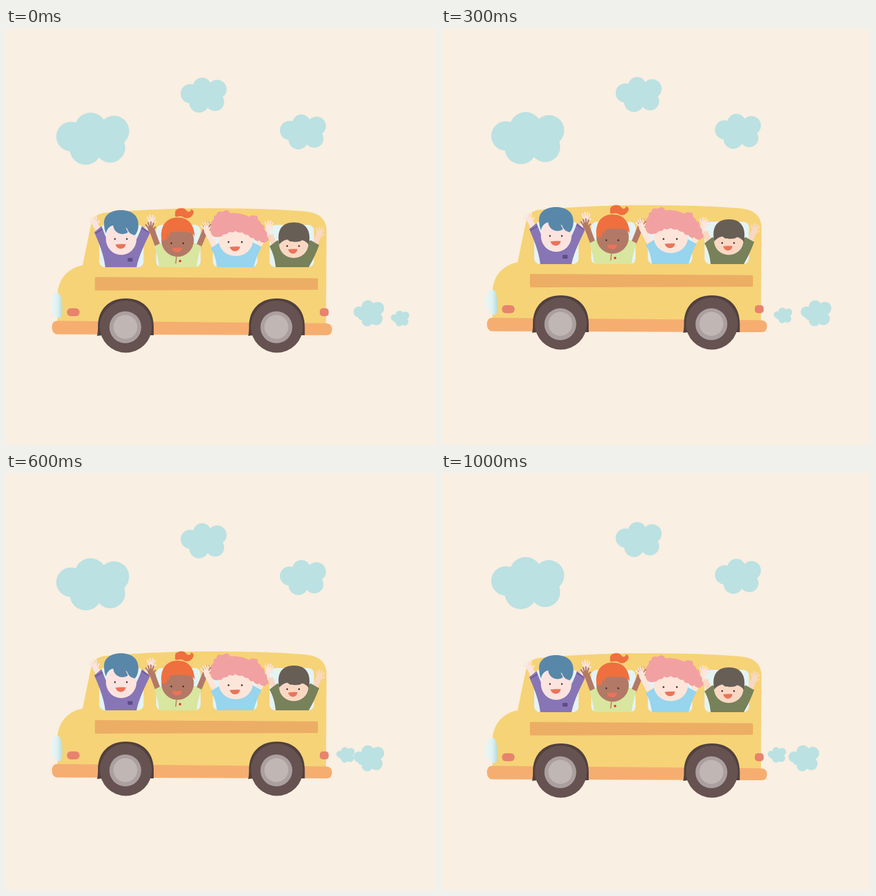
Write an HTML page that moves like this. It is 700 px wide and 680 px high and loops after 1.1 s.

```html
<!DOCTYPE html>
<html lang="en">
<head>
<meta charset="utf-8">
<title>School bus</title>
<style>
  html, body { margin: 0; width: 100%; height: 100%; overflow: hidden; background: #f9efe2; }
  svg { display: block; width: 100%; height: 100%; }

  .move { animation: 1100ms step-end infinite; }
  #bus { animation-name: bounce; }
  #sky { animation-name: drift; }
  #puff-big { animation-name: big; }
  #puff-small { animation-name: small; }

  /* eleven held poses of 100 ms */
  @keyframes bounce {
    0%, 90.9% { transform: translateY(0); }
    9.09%, 45.45%, 81.81% { transform: translateY(-1px); }
    18.18%, 72.72% { transform: translateY(-2px); }
    36.36%, 54.54% { transform: translateY(-3px); }
    27.27%, 63.63% { transform: translateY(-5px); }
  }
  @keyframes drift {
    0%, 45.45% { transform: translateY(0); }
    27.27%, 90.9% { transform: translateY(-1px); }
    54.54%, 81.81% { transform: translateY(1px); }
    63.63% { transform: translateY(2px); }
  }
  @keyframes big {
    0%, 45.45%, 81.81% { transform: translate(567px, 444px); }
    27.27% { transform: translate(587px, 444px); }
    36.36% { transform: translate(577px, 444px); }
    72.72% { transform: translate(539px, 437px); }
  }
  @keyframes small {
    0%, 72.72% { transform: translate(628px, 461px); }
    9.09% { transform: translate(645px, 454px); }
    18.18% { transform: translate(662px, 447px); }
    27.27% { transform: translate(543px, 456px); }
    36.36% { transform: translate(538px, 451px); }
    45.45%, 90.9% { transform: translate(533px, 447px); }
    54.54% { transform: translate(539px, 447px); }
    63.63% { transform: translate(545px, 447px); }
    81.81% { transform: translate(641px, 455px); }
  }

  .air { fill: #bbe1e2; }
  .eye { fill: #3a2a28; }
  .mouth { fill: #e9745a; }
  .glass { fill: #e4f3f4; }
  .lamp { fill: #e8836d; }
  .arm { fill: none; stroke-width: 9; }
  .pink { fill: #fbe3df; stroke: #fbe3df; }
  .brown { fill: #b27966; stroke: #b27966; }
  .cream { fill: #fde5da; stroke: #fde5da; }
  .peach { fill: #f9d8c3; stroke: #f9d8c3; }
  .face { stroke: none; }
  .pink.arm, .brown.arm, .cream.arm, .peach.arm { fill: none; }
</style>
</head>
<body>
<svg viewBox="0 0 700 680">
  <defs>
    <g id="cloud">
      <circle cx="24" cy="39" r="24"/>
      <circle cx="56" cy="26" r="26"/>
      <circle cx="94" cy="30" r="25"/>
      <circle cx="88" cy="57" r="24.5"/>
      <circle cx="48" cy="59" r="26"/>
      <rect x="35" y="22" width="62" height="42"/>
    </g>
    <g id="cloudlet">
      <circle cx="15.5" cy="26" r="15.5"/>
      <circle cx="35" cy="15" r="15"/>
      <circle cx="59.5" cy="19" r="15.5"/>
      <circle cx="56" cy="39.5" r="15"/>
      <circle cx="30" cy="41" r="16"/>
      <rect x="22" y="15" width="38" height="28"/>
    </g>
    <g id="puff">
      <circle cx="9" cy="19" r="9"/>
      <circle cx="23.5" cy="10.5" r="10.5"/>
      <circle cx="39.5" cy="13" r="10.5"/>
      <circle cx="37" cy="30" r="10.5"/>
      <circle cx="22.5" cy="33" r="9.3"/>
      <circle cx="13" cy="26" r="6"/>
      <rect x="14" y="12" width="26" height="20"/>
    </g>
    <g id="wheel">
      <path fill="#51403e" d="M-47 15Q-45.500 11-45.500 0C-45.500-29-27-46 0-46S45.500-29 45.500 0V14H-38Z"/>
      <circle r="42.500" fill="#655251"/>
      <circle cx="-.8" cy="1" r="26" fill="#ab9fa0"/>
      <circle cx="-.8" cy=".5" r="19.500" fill="#c0b7b5"/>
    </g>
    <g id="hand">
      <ellipse rx="4.500" ry="5.500" stroke="none"/>
      <path fill="none" stroke-width="2.400" stroke-linecap="round"
        d="M-3-1L-6.500-8M-1.300-3L-2.500-11M1-3L2-11.500M2.800-2L6-9M3 2L8-2"/>
    </g>
    <rect id="window" y="321" width="72.500" height="69" rx="9"/>
    <g id="eyes">
      <ellipse cx="-9.700" rx="1.300" ry="1.600"/>
      <ellipse cx="9.700" rx="1.300" ry="1.600"/>
    </g>
    <path id="smile" d="M-8.500 0Q0-1 8.500-.5Q7 7 0 7Q-6 7-8.500 0Z"/>
    <linearGradient id="beam">
      <stop offset=".1" stop-color="#e9f5f5"/>
      <stop offset=".55" stop-color="#dff1f1"/>
      <stop offset="1" stop-color="#b5dcda"/>
    </linearGradient>
  </defs>

  <rect width="700" height="680" fill="#f9efe2"/>

  <g id="sky" class="move air">
    <use href="#cloud" x="82" y="138"/>
    <use href="#cloudlet" x="285" y="81"/>
    <use href="#cloudlet" x="447" y="141"/>
  </g>

  <g class="air">
    <g id="puff-big" class="move"><use href="#puff"/></g>
    <g id="puff-small" class="move"><use href="#puff" transform="scale(.6)"/></g>
  </g>

  <g id="bus" class="move">
    <path fill="#f6d377" d="M125 387L138 324C142 306 151 302 165 301C225 296 280 294 320 294C390 294 440 295 487 299C511 301 523 311 523 332L522 490H84V433C86 407 103 391 125 387Z"/>
    <path fill="#f5ae70" d="M83 477.500L522 481.500Q532 482 532 491Q532 501 523 501L84 499.500Q75 499 75 488Q75 478 83 477.500Z"/>
    <path fill="#ecae65" d="M147 406L507 408Q509 408 509 410V425Q509 427 507 427L147 428Q145 428 145 426V408Q145 406 147 406Z"/>
    <path fill="url(#beam)" d="M84 431.500C90 432 92 445 92 457C92 469 91 473 87 473C79 472 73 465 73 450C73 438 78 431 84 431.500Z"/>
    <rect class="lamp" x="99.500" y="457" width="20.500" height="13" rx="6"/>
    <rect class="lamp" x="512" y="457" width="14.500" height="13" rx="5"/>
    <use href="#wheel" x="195.500" y="487"/>
    <use href="#wheel" x="442" y="487"/>
    <g class="glass">
      <use href="#window" x="152"/>
      <use href="#window" x="245"/>
      <use href="#window" x="337.500"/>
      <use href="#window" x="430"/>
    </g>

    <!-- blue hair -->
    <g>
      <path class="arm pink" d="M146 321L152 332M236 318L228 332"/>
      <use class="pink" href="#hand" transform="translate(145 319) rotate(-22)"/>
      <use class="pink" href="#hand" transform="translate(236 317) rotate(8)"/>
      <path fill="#8875b6" d="M144 333L156 323C162 340 166 349 172 356H206C213 346 218 334 222 323L235 334C228 349 217 370 213 390H162C160 370 151 349 144 333Z"/>
      <path fill="none" stroke="#5d4c87" stroke-width="1.200" d="M146 335L157.500 328M221 326L233 333"/>
      <rect x="198.500" y="375" width="8" height="6" fill="#5d4c87"/>
      <ellipse class="pink face" cx="188" cy="344" rx="25" ry="26"/>
      <path fill="#5987a9" d="M163 335C161 330 160 324 160 318C160 304 172 297 188 297C205 297 216 306 216 320C216 328 214 334 210 338C205 337 200 334 198 328C197 326 195 324 196 327C197 330 200 332 198 334C188 339 176 334 175 322C169 323 165 327 163 335Z"/>
      <use class="eye" href="#eyes" x="187.500" y="344"/>
      <use class="mouth" href="#smile" x="187" y="353"/>
    </g>

    <!-- orange hair -->
    <g>
      <path class="arm brown" d="M238 329L248 356M326 328L314 357"/>
      <use class="brown" href="#hand" transform="translate(236 328) rotate(-8)"/>
      <use class="brown" href="#hand" transform="translate(326 328) rotate(14)"/>
      <path fill="#d8e69f" d="M242 356L254 350Q280 364 307 350L319 356C315 367 312 378 311 390H250C249 378 246 367 242 356Z"/>
      <ellipse class="brown face" cx="280" cy="346" rx="26.500" ry="27"/>
      <path stroke="#b77956" stroke-width="1.500" d="M278 373L277 384"/>
      <circle cx="284" cy="380" r="2" fill="#dc3b32"/>
      <path fill="#ef6f3f" d="M253.500 342C252 322 262 309 280 309C299 309 307 322 308 340C306 336 302 334 298 333C288 332 276 332 268 333.500L266 342L264 336L262 347C260 343 258 348 255 347ZM276 302C275 295 284 293 289 294C295 295 295 302 300 299C303 298 302 296 300 296C305 295 308 300 305 304C302 310 294 312 289 308C284 306 280 308 277 308C275 306 276 304 276 302Z"/>
      <use class="eye" href="#eyes" x="279.500" y="351"/>
      <use class="mouth" href="#smile" x="279" y="359"/>
    </g>

    <!-- curly hair -->
    <g>
      <path class="arm cream" d="M327 330L341 357M428 330L411 357"/>
      <use class="cream" href="#hand" transform="translate(327 328) rotate(-18)"/>
      <path fill="#97d4ed" d="M334 359L348 350Q375 362 402 349L417 357C411 368 407 378 404 390H344C343 378 340 368 334 359Z"/>
      <ellipse class="cream face" cx="375" cy="346" rx="28" ry="26"/>
      <path fill="#f2a1a2" d="M334 331C331 325 336 323 335 320C333 315 340 314 339 310C338 305 345 306 344 302C347 297 352 301 355 299C359 296 365 297 365 302C376 301 388 303 397 308C399 304 405 306 408 306C413 307 410 312 412 314C417 315 414 319 419 321C424 324 419 328 424 331C428 335 424 339 428 342C430 347 426 347 423 350C419 351 415 349 413 346C409 349 406 346 403 342C400 344 397 341 395 337C391 339 388 335 385 333C381 335 378 333 374 331C371 335 367 333 364 332C362 337 357 336 354 337C352 342 347 340 344 341C340 342 337 338 335 336Z"/>
      <use class="cream" href="#hand" transform="translate(428 326) rotate(10)"/>
      <use class="eye" href="#eyes" transform="translate(374 349) scale(1.120 1)"/>
      <use class="mouth" href="#smile" x="373.500" y="357"/>
    </g>

    <!-- dark hair -->
    <g>
      <path class="arm peach" d="M431 337L438 354M510 338L504 353"/>
      <use class="peach" href="#hand" transform="translate(511 336) rotate(16)"/>
      <path fill="#77815a" d="M430 356L443 346Q469 372 497 346L511 354C506 367 500 380 494 390H440C439 378 436 367 430 356Z"/>
      <ellipse class="peach face" cx="469.500" cy="352" rx="24" ry="23"/>
      <path fill="#675e56" d="M446 353C442 335 446 317 470 317C493 317 498 335 494 354C492 350 488 347 483 346C481 348 475 350 466 348C462 349 462 346 459 345C453 346 449 349 446 353Z"/>
      <use class="eye" href="#eyes" x="468.500" y="355.500"/>
      <use class="mouth" href="#smile" transform="translate(468 361) scale(.9 1)"/>
    </g>
  </g>
</svg>
</body>
</html>
```
